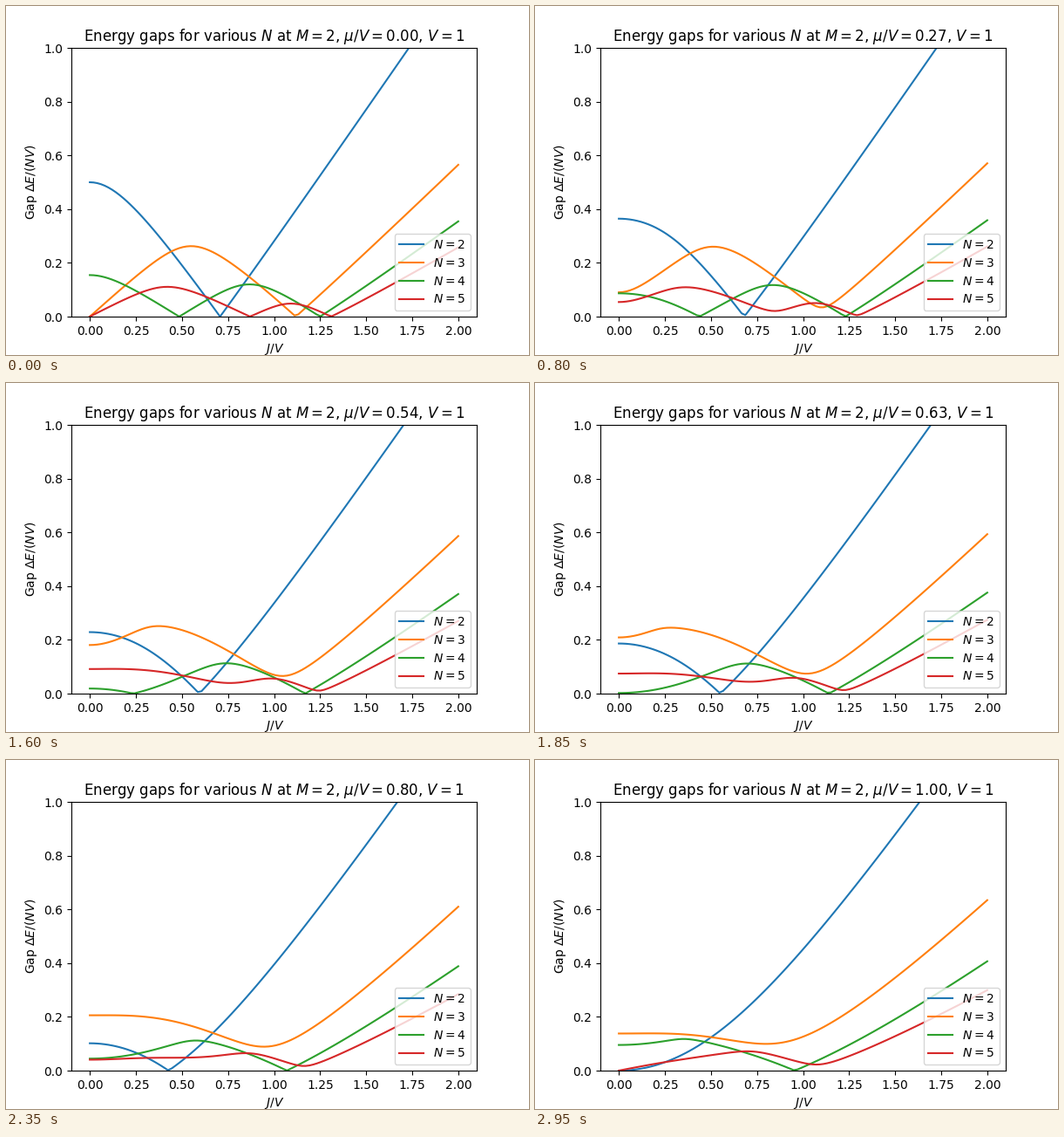
These frames come from a looping animation (600 px wide and 400 px high, 3000 ms). A matplotlib script:

```python
import numpy as np
import matplotlib.pyplot as plt
from matplotlib.animation import FuncAnimation

FRAMES = 60
INTERVAL = 50
V = 1
SIZES = (2, 3, 4, 5)

J = np.linspace(0, 2, 100)
MU = np.linspace(0, 1, FRAMES)

RAISE = np.array([[0., 0.], [1., 0.]])


def site_op(op, i, n):
    """Embed a two-level operator at site i of an n-site chain."""
    return np.kron(np.kron(np.eye(2**i), op), np.eye(2**(n - i - 1)))


def chain_terms(n):
    """Hopping, particle number and drive for an open hard-core boson chain."""
    up = [site_op(RAISE, i, n) for i in range(n)]
    hop = sum(a @ b.T + b @ a.T for a, b in zip(up, up[1:]))
    number = sum(a @ a.T for a in up)
    drive = sum(a + a.T for a in up)
    return hop, number, drive


TERMS = {n: chain_terms(n) for n in SIZES}


def gap(n, mu):
    hop, number, drive = TERMS[n]
    h = V * hop - mu * number + J[:, None, None] * drive
    e = np.linalg.eigvalsh(h)
    return (e[:, 1] - e[:, 0]) / (n * V)


fig, ax = plt.subplots(figsize=(6, 4), dpi=100)
lines = {n: ax.plot(J, gap(n, 0), label=f"$N={n}$")[0] for n in SIZES}
ax.set_ylim(0, 1)
ax.set_xlabel("$J/V$")
ax.set_ylabel(r"Gap $\Delta E/(NV)$")
ax.legend(loc="lower right")


def update(i):
    mu = MU[i]
    for n, line in lines.items():
        line.set_ydata(gap(n, mu))
    ax.set_title(rf"Energy gaps for various $N$ at $M=2$, $\mu/V={mu:.2f}$, $V={V}$")
    return list(lines.values())


anim = FuncAnimation(fig, update, frames=FRAMES, interval=INTERVAL,
                     repeat=True, repeat_delay=0, blit=False)
plt.show()
```
